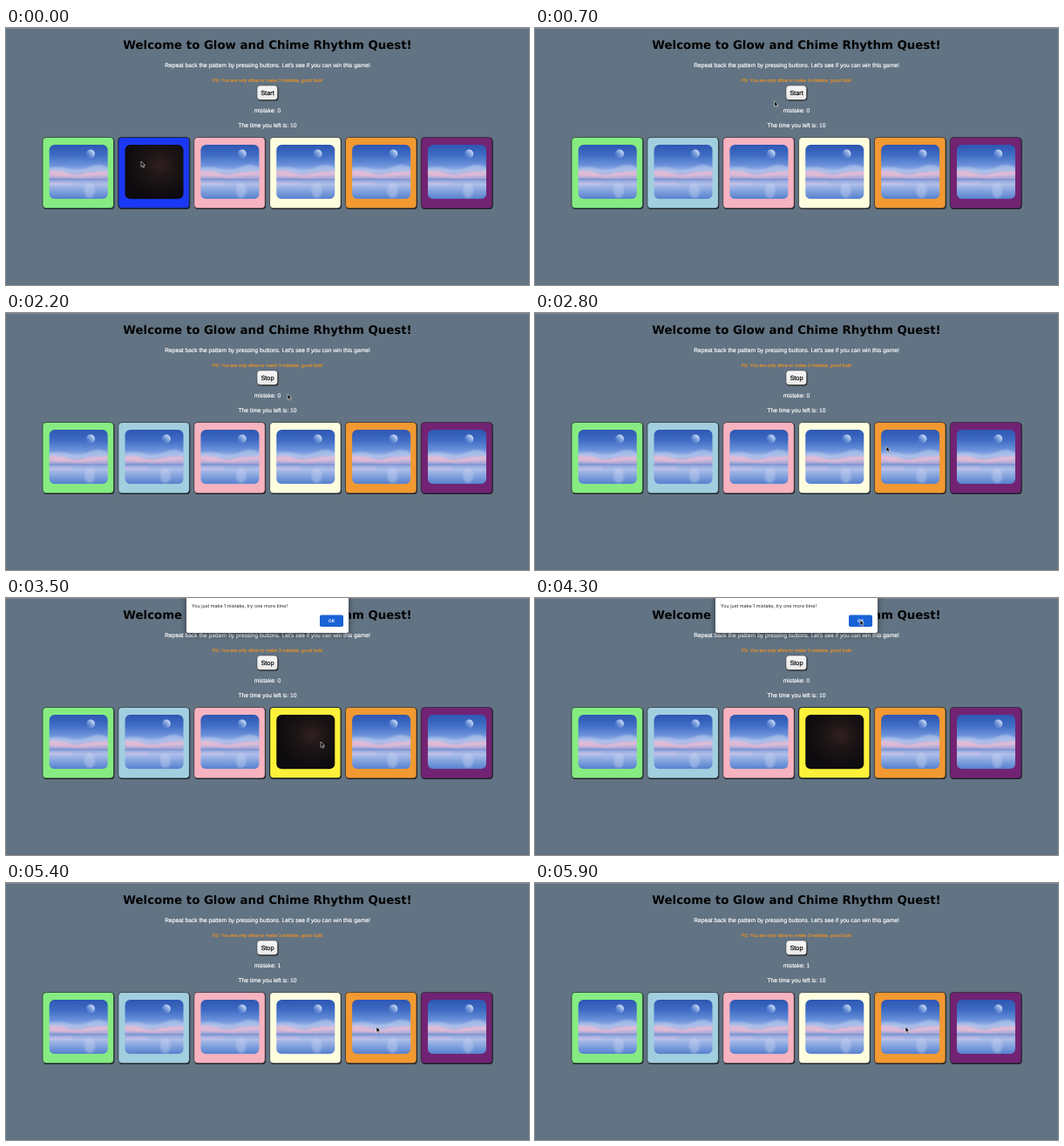
Recreate the animation shown at these times as an HTML page. Size 600 by 295 pixels, loop 6000 ms.

```html
<!DOCTYPE html>
<html lang="en">
<head>
<meta charset="utf-8">
<title>Pattern game</title>
<style>
html, body { margin: 0; width: 100%; height: 100%; overflow: hidden; background: #627383; }
svg { display: block; width: 100vw; height: 100vh; }
text { font-family: "Liberation Sans", Arial, sans-serif; font-size: 6.66px; fill: #fff; stroke: #fff; stroke-width: .16; text-anchor: middle; text-rendering: geometricPrecision; }
.title { font: bold 13.33px "DejaVu Sans", Verdana, sans-serif; fill: #000; stroke: none; }
.note { font-size: 5.43px; fill: #f7941d; stroke: #f7941d; stroke-width: .1; }
.btn { font-size: 7.4px; fill: #000; stroke: #000; }
.msg { font: 5.4px Inter, sans-serif; fill: #202124; stroke: none; text-anchor: start; }
.ok { font: 600 5px Inter, sans-serif; stroke: none; }
</style>
</head>
<body>
<svg viewBox="0 0 600 295" preserveAspectRatio="none">
  <defs>
    <linearGradient id="sky" x2="0" y2="1">
      <stop offset="0" stop-color="#2d56b2"/>
      <stop offset=".2" stop-color="#3f6cc4"/>
      <stop offset=".38" stop-color="#6a91da"/>
      <stop offset=".48" stop-color="#94afe4"/>
      <stop offset=".56" stop-color="#b5b6e0"/>
      <stop offset=".63" stop-color="#909fd6"/>
      <stop offset=".65" stop-color="#8ea3db"/>
      <stop offset=".73" stop-color="#afbee9"/>
      <stop offset=".84" stop-color="#86a5df"/>
      <stop offset="1" stop-color="#547fcd"/>
    </linearGradient>
    <linearGradient id="moon" x1="1" x2="0" y2="1">
      <stop offset=".2" stop-color="#c3d7f5"/>
      <stop offset=".75" stop-color="#a4c0ee" stop-opacity=".15"/>
    </linearGradient>
    <radialGradient id="night" cx=".6" cy=".38" r=".6">
      <stop offset="0" stop-color="#34211f"/>
      <stop offset=".4" stop-color="#1d1516"/>
      <stop offset="1" stop-color="#0d0b0e"/>
    </radialGradient>
    <linearGradient id="face" x2="0" y2="1">
      <stop offset="0" stop-color="#f6f6f6"/>
      <stop offset="1" stop-color="#e9e9e9"/>
    </linearGradient>
    <filter id="soft" x="-20%" y="-50%" width="140%" height="220%"><feGaussianBlur stdDeviation="3"/></filter>
    <filter id="haze" x="-20%" y="-50%" width="140%" height="200%"><feGaussianBlur stdDeviation="1"/></filter>
    <clipPath id="frame"><rect x="7.7" y="8.5" width="67" height="62.3" rx="6"/></clipPath>
    <g id="day" clip-path="url(#frame)">
      <rect x="7" y="8" width="69" height="63" fill="url(#sky)"/>
      <g filter="url(#haze)">
        <path d="M4 36Q18 32 30 36T54 34T78 37V40Q60 38 48 40T4 39Z" fill="#bccbee" opacity=".6"/>
        <path d="M4 39Q18 37 28 41T46 42T78 39V43Q60 44 46 45T4 43Z" fill="#efbcd2" opacity=".8"/>
        <path d="M4 45H30L44 46.5H78" fill="none" stroke="#e9b4cb" stroke-width="1.6" opacity=".6"/>
        <ellipse cx="54" cy="61" rx="6" ry="9" fill="#cbd6f3" opacity=".4"/>
        <path d="M4 53H34" stroke="#d9c3e4" stroke-width="2.5" opacity=".6"/>
      </g>
      <path d="M7 48.3H75" stroke="#6f89cb" stroke-width=".8"/>
      <circle cx="55" cy="19" r="5" fill="url(#moon)"/>
    </g>
    <rect id="dark" x="7.7" y="8.5" width="67" height="62.3" rx="6" fill="url(#night)"/>
  </defs>
  <rect width="600" height="295" fill="#627383"/>
  <rect width="600" height="1" fill="#fff" opacity=".18"/>
  <text class="title" x="300" y="24.2">Welcome to Glow and Chime Rhythm Quest!</text>
  <text x="300" y="45.4">Repeat back the pattern by pressing buttons. Let's see if you can win this game!</text>
  <text class="note" x="300" y="62">PS: You are only allow to make 3 mistake, good luck!</text>
  <rect x="288.4" y="66.4" width="24" height="17" rx="3.5" fill="#111"/>
  <rect x="288" y="66" width="23.6" height="16.6" rx="3.5" fill="url(#face)" stroke="#333" stroke-width=".5"/>
  <text class="btn" id="toggle" x="300" y="76.8"></text>
  <text id="count" x="300" y="97.3"></text>
  <text x="300" y="114.4">The time you left is: 10</text>
  <g id="cards"></g>
  <g id="alert">
    <rect x="206" y="-6" width="188" height="49" rx="3" fill="#000" opacity=".4" filter="url(#soft)"/>
    <rect x="207" y="-4" width="186" height="44" rx="2" fill="#fff"/>
    <text class="msg" x="213" y="11.2">You just make 1 mistake, try one more time!</text>
    <rect x="360" y="19.5" width="27" height="13.6" rx="1.8" fill="#1a62d6"/>
    <text class="ok" x="373.5" y="28.1">OK</text>
  </g>
  <path id="cursor" d="M0 0V6.4L1.5 5.1L2.5 7.4L3.6 6.9L2.6 4.7H4.6Z" fill="#000" stroke="#fff" stroke-width=".55" stroke-linejoin="round"/>
</svg>
<script>
const LOOP = 6000, STEP = 100;
const START = 1000, ALERT = 3500, CLOSE = 4500;
const colors = ["#86ec82", "#a2cfdf", "#f7b3bf", "#fefedf", "#f29932", "#722373"];
const lit = { 1: "#1a38f5", 3: "#fdf13a" };
// resting places of the pointer: time, x, y
const path = [
  [0, 155, 153], [100, 155, 153], [890, 295, 72], [1900, 295, 72], [2800, 403, 153],
  [3300, 361, 165], [3600, 361, 165], [4300, 373, 25], [CLOSE, 373, 25],
  [5130, 425, 165], [LOOP, 425, 165]
];
const el = id => document.getElementById(id);
const between = (t, a, b) => t >= a && t < b;

el("cards").innerHTML = colors.map((c, i) => `<g transform="translate(${42 + i * 86.85} 125.5)">
  <rect x=".4" y=".5" width="82" height="82" rx="4" fill="#15181c"/>
  <rect class="card" width="81.6" height="81.4" rx="4" stroke="#222a30" stroke-width=".7"/>
  <use class="photo"/></g>`).join("");
const cards = [...document.querySelectorAll(".card")];
const photos = [...document.querySelectorAll(".photo")];

function pointer(t) {
  const i = path.findIndex(p => p[0] > t);
  const [t0, x0, y0] = path[i - 1], [t1, x1, y1] = path[i];
  const u = (t - t0) / (t1 - t0), k = u * u * (3 - 2 * u);
  return [x0 + (x1 - x0) * k, y0 + (y1 - y0) * k];
}

function draw(t) {
  const active = t < 200 ? 1 : between(t, ALERT - STEP, CLOSE) ? 3 : -1;
  cards.forEach((card, i) => {
    const on = i === active;
    card.setAttribute("fill", on ? lit[i] : colors[i]);
    card.setAttribute("stroke-width", on ? 1.2 : 0.7);
    photos[i].setAttribute("href", on ? "#dark" : "#day");
  });
  el("toggle").textContent = t < START ? "Start" : "Stop";
  el("count").textContent = "mistake: " + (t < CLOSE ? 0 : 1);
  el("alert").style.display = between(t, ALERT, CLOSE) ? "" : "none";
  el("cursor").setAttribute("transform", `translate(${pointer(t)})`);
}

const start = performance.now();
function tick() {
  const t = (performance.now() - start) % LOOP;
  draw(Math.floor(t / STEP) * STEP);
  requestAnimationFrame(tick);
}
tick();
</script>
</body>
</html>
```
